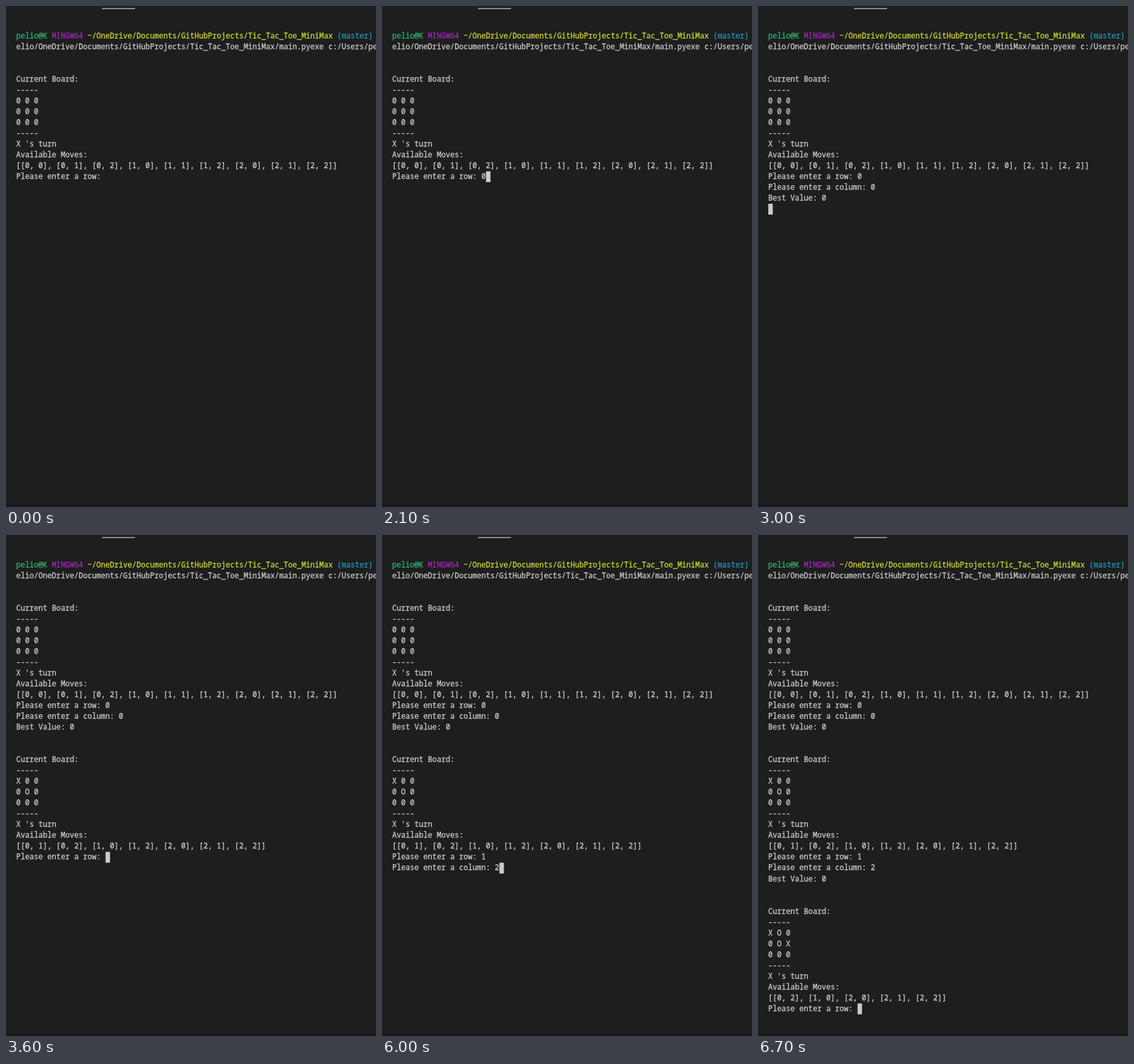
These frames come from a looping animation (582 by 788 pixels, 8 s). An HTML page:

```html
<!DOCTYPE html>
<html lang="en">
<head>
<meta charset="utf-8">
<title>Tic Tac Toe terminal</title>
<style>
  html, body { margin: 0; width: 100%; height: 100%; overflow: hidden; background: #1e1e1e; }
  div, pre { position: absolute; margin: 0; }
  pre { left: 16px; top: 37.6px; font: 11.7px/17.03px "Noto Sans Mono", "DejaVu Sans Mono", monospace;
        font-variant-ligatures: none; color: #ccc; -webkit-text-stroke: 0.3px; }
  .user { color: #1fba70; }
  .host { color: #9a2bb0; }
  .path { color: #cdd62a; }
  .branch { color: #2199bd; }
  #tab { left: 151px; top: 3px; width: 52px; height: 2px; background: #8c8c8c; }
  #edge { left: 0; top: 784px; width: 582px; height: 4px; background: #1a151b; }
  #cursor { left: 0; top: 0; width: 7px; height: 17px; background: #ccc; }
</style>
</head>
<body>
<div id="tab"></div>
<div id="edge"></div>
<div id="cursor"></div>
<pre><span class="user">pelio@K</span> <span class="host">MINGW64</span> <span class="path">~/OneDrive/Documents/GitHubProjects/Tic_Tac_Toe_MiniMax</span> <span class="branch">(master)</span>
elio/OneDrive/Documents/GitHubProjects/Tic_Tac_Toe_MiniMax/main.pyexe c:/Users/pe
<span id="log"></span></pre>
<script>
const LOOP = 8000, CURSOR_ON = 700;
const LEFT = 16.2, TOP = 38.6, COL = 7.02, ROW = 17.03, FIRST_ROW = 2;
const log = document.getElementById("log");
const cursor = document.getElementById("cursor");

// A turn prints the board, its free cells and the row prompt.
function turn(...rows) {
  const moves = rows.flatMap((row, r) =>
    [...row].flatMap((cell, c) => cell === "0" ? `[${r}, ${c}]` : []));
  const board = rows.map(row => [...row].join(" ")).join("\n");
  return `\n\nCurrent Board:\n-----\n${board}\n-----\nX 's turn\n` +
    `Available Moves:\n[${moves.join(", ")}]\nPlease enter a row: `;
}

const askColumn = "\nPlease enter a column: ";
const best = "Best Value: 0\n";

// Each step appends output at its time in ms.
const steps = [
  [0, turn("000", "000", "000")],
  [2100, "0"],
  [2200, askColumn],
  [2500, "0"],
  [2800, "\n"],
  [3000, best],
  [3100, turn("X00", "0O0", "000")],
  [5200, "1"],
  [5300, askColumn],
  [5600, "2"],
  [6100, "\n"],
  [6200, best],
  [6300, turn("XO0", "0OX", "000")],
];

let shown;
function draw(now) {
  const t = now % LOOP;
  const text = steps.filter(([at]) => at <= t).map(step => step[1]).join("");
  if (text !== shown) {
    log.textContent = shown = text;
    const lines = text.split("\n");
    const x = LEFT + lines.at(-1).length * COL;
    const y = TOP + (FIRST_ROW + lines.length - 1) * ROW;
    cursor.style.transform = `translate(${x}px, ${y}px)`;
  }
  cursor.hidden = t < CURSOR_ON;
}

const start = performance.now();
function tick() {
  draw(performance.now() - start);
  requestAnimationFrame(tick);
}
tick();
</script>
</body>
</html>
```
